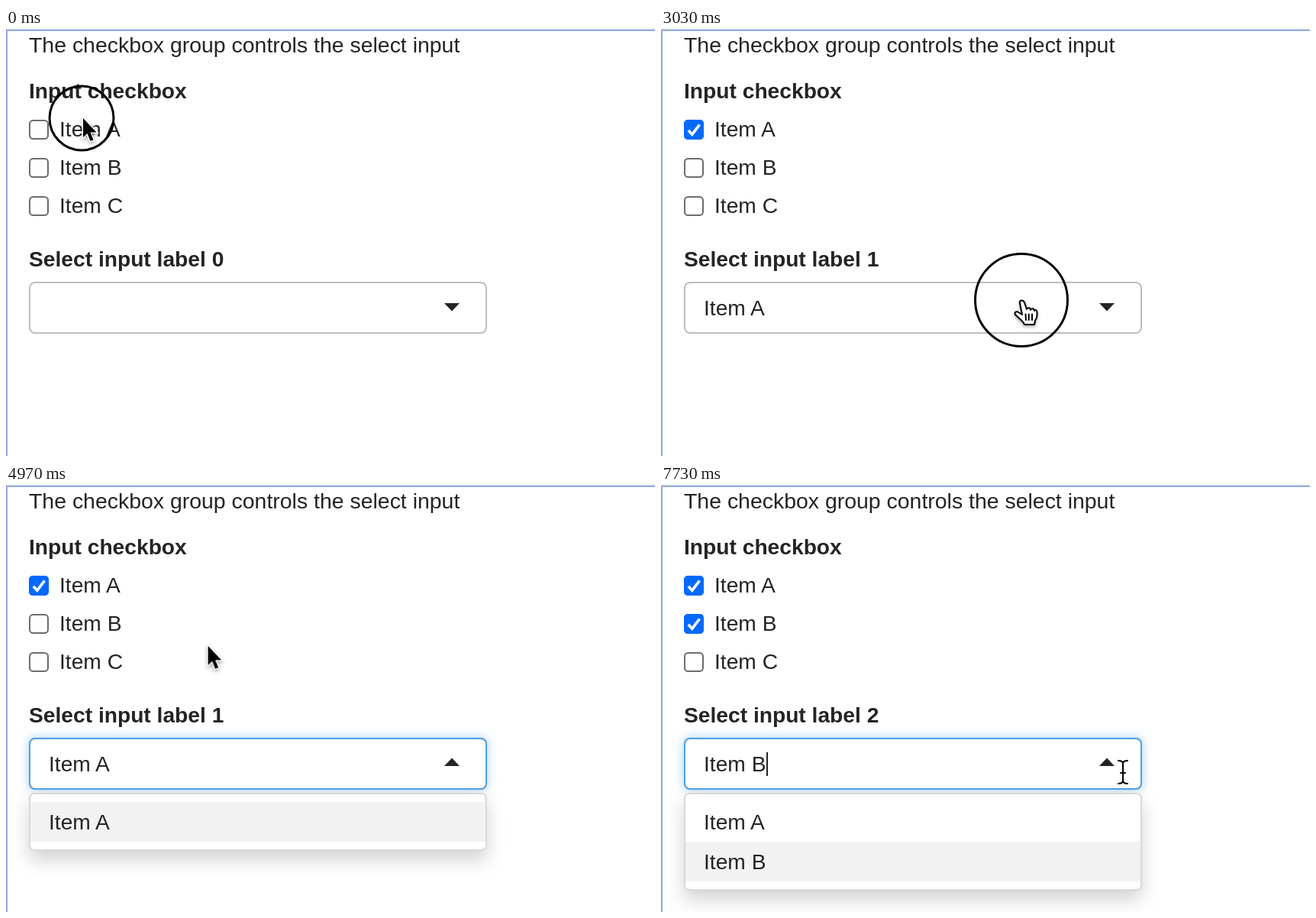
An HTML page for the animation above (8 s loop, 850 px wide and 560 px high).

```html
<!DOCTYPE html>
<html lang="en">
<head>
<meta charset="utf-8">
<title>Checkbox group and select input</title>
<style>
html, body { margin: 0; width: 100%; height: 100%; overflow: hidden; background: #fff; }
svg { display: block; width: 850px; height: 560px; }
text { font: 28.2px "Liberation Sans", Arial, sans-serif; fill: #222426; }
.title { font-size: 28.45px; }
.bold { font-weight: bold; }
.box { fill: #fff; stroke: #6d6d6d; stroke-width: 2; }
.hover { fill: none; stroke: #404040; stroke-width: 2; }
.field { fill: #fff; stroke: #bfbfc1; stroke-width: 2; }
.focus { stroke: #529fe2; filter: drop-shadow(0 0 7px rgba(102,175,233,.6)); }
.menu { fill: #fff; stroke: #d9d9d9; stroke-width: 2; filter: drop-shadow(0 12px 12px rgba(0,0,0,.175)); }
.active { fill: #f2f2f2; }
.dark { fill: #222426; }

/* on/off states */
.step { animation: 8s step-end infinite; }
.hoverA { animation-name: hoverA; }
.hoverB { animation-name: hoverB; }
.checkA { animation-name: checkA; }
.checkB { animation-name: checkB; }
.none { animation-name: none-picked; }
.one { animation-name: one-picked; }
.two { animation-name: two-picked; }
.focused { animation-name: focused; }
.opened { animation-name: opened; }
.closed { animation-name: closed; }
.menu1 { animation-name: menu1; }
.menu2 { animation-name: menu2; }
.caret { animation-name: caret; }
.arrow { animation-name: arrow; }
.hand { animation-name: hand; }
.beam { animation-name: beam; }
@keyframes hoverA { 0%, 24.125% { opacity: 0 } 14.5% { opacity: 1 } }
@keyframes hoverB { 0%, 67.125% { opacity: 0 } 64% { opacity: 1 } }
@keyframes checkA { 0% { opacity: 0 } 24.125% { opacity: 1 } }
@keyframes checkB { 0% { opacity: 0 } 67.125% { opacity: 1 } }
@keyframes none-picked { 0% { opacity: 1 } 25% { opacity: 0 } }
@keyframes one-picked { 0%, 68.125% { opacity: 0 } 25% { opacity: 1 } }
@keyframes two-picked { 0% { opacity: 0 } 68.125% { opacity: 1 } }
@keyframes focused { 0%, 66.625% { opacity: 0 } 38.5%, 83.5% { opacity: 1 } }
@keyframes opened { 0%, 66.625%, 87.5% { opacity: 0 } 38.5%, 83.5%, 95% { opacity: 1 } }
@keyframes closed { 0%, 66.625%, 87.5% { opacity: 1 } 38.5%, 83.5%, 95% { opacity: 0 } }
@keyframes menu1 { 0%, 66.625% { opacity: 0 } 38.5% { opacity: 1 } }
@keyframes menu2 { 0%, 87.5% { opacity: 0 } 83.5%, 95% { opacity: 1 } }
@keyframes caret {
  0%, 44.75%, 57.25%, 66.625%, 87.5% { opacity: 0 }
  38.5%, 51%, 63.5%, 83.5%, 95% { opacity: 1 }
}
@keyframes arrow {
  0%, 30.9%, 58.5%, 71.6% { opacity: 1 }
  14%, 35%, 63.25%, 76.9% { opacity: 0 }
}
@keyframes hand {
  0%, 30.9%, 38.5%, 71.6%, 83.5%, 95% { opacity: 0 }
  14%, 35%, 63.25%, 76.9%, 87.5% { opacity: 1 }
}
@keyframes beam {
  0%, 58.5%, 87.5% { opacity: 0 }
  38.5%, 83.5%, 95% { opacity: 1 }
}

/* pointer path and click rings */
.pointer { animation: move 8s ease-in-out infinite; }
@keyframes move {
  0%, .375% { transform: translate(99px, 118px) }
  6.625%, 10% { transform: translate(506px, 280px) }
  15.875%, 19.125% { transform: translate(64px, 126px) }
  20.375%, 27.5% { transform: translate(54px, 135px) }
  37.25%, 44.625% { transform: translate(472px, 356px) }
  48.75%, 50% { transform: translate(565px, 367px) }
  53.75% { transform: translate(580px, 370px) }
  55% { transform: translate(580px, 370px); animation-timing-function: ease-in }
  62.125% { transform: translate(264px, 212px); animation-timing-function: ease-out }
  65% { transform: translate(72px, 187px) }
  68.5% { transform: translate(72px, 187px); animation-timing-function: ease-in }
  76.25% { transform: translate(545px, 314px); animation-timing-function: ease-out }
  80%, 100% { transform: translate(605px, 377px) }
}
.ring { fill: none; stroke: #000; stroke-width: 3; animation: ring 8s linear infinite; }
@keyframes ring {
  0%, .5% { r: 60.5px; opacity: 1 }
  2.5% { r: 0; opacity: 1 }
  2.51%, 100% { r: 0; opacity: 0 }
}
.shade { filter: drop-shadow(0 2px 2px rgba(0,0,0,.35)); }
.ink { fill: none; stroke: #000; stroke-width: 2; stroke-linecap: round; }
.halo { fill: none; stroke: #fff; stroke-width: 4.5; stroke-linecap: round; }
</style>
</head>
<body>
<svg viewBox="0 0 850 560">
  <defs>
    <g id="tick">
      <rect width="26" height="26" rx="5" fill="#0569ff"/>
      <path d="M5.8 14 10.8 19.2 20.5 6.5" fill="none" stroke="#fff" stroke-width="3.6"/>
    </g>
    <rect id="square" x="1" y="1" width="24" height="24" rx="4.5"/>
    <rect id="frame" x="31" y="333" width="598" height="66" rx="7"/>
    <path id="ibeam" d="M-6-15Q0-15 0-11Q0-15 6-15M-6 15Q0 15 0 11Q0 15 6 15M0-11V11M-3 1H3"/>
  </defs>

  <rect width="850" height="3" fill="#ececf0"/>
  <path d="M0 3H850M1 3V560" fill="none" stroke="#8ea8de" stroke-width="2"/>

  <text class="title" x="30" y="32">The checkbox group controls the select input</text>
  <text class="bold" x="30" y="92">Input checkbox</text>

  <use href="#square" class="box" x="30" y="120"/>
  <use href="#square" class="box" x="30" y="170"/>
  <use href="#square" class="box" x="30" y="220"/>
  <use href="#square" class="hover step hoverA" x="30" y="120"/>
  <use href="#square" class="hover step hoverB" x="30" y="170"/>
  <use href="#tick" class="step checkA" x="30" y="120"/>
  <use href="#tick" class="step checkB" x="30" y="170"/>
  <text x="70" y="142">Item A</text>
  <text x="70" y="192">Item B</text>
  <text x="70" y="242">Item C</text>

  <text class="bold step none" x="30" y="312">Select input label 0</text>
  <text class="bold step one" x="30" y="312">Select input label 1</text>
  <text class="bold step two" x="30" y="312">Select input label 2</text>

  <use href="#frame" class="field"/>
  <g class="step focused"><use href="#frame" class="field focus"/></g>
  <text class="step one" x="56" y="376">Item A</text>
  <text class="step two" x="56" y="376">Item B</text>
  <rect class="dark step caret" x="138" y="351" width="2" height="31"/>
  <path class="dark step closed" d="M574 360H594L584 370.5Z"/>
  <path class="dark step opened" d="M574 369H594L584 358.5Z"/>

  <g class="step menu1">
    <rect class="menu" x="31" y="405" width="598" height="74" rx="6"/>
    <rect class="active" x="32" y="416" width="596" height="52"/>
    <text x="56" y="452">Item A</text>
  </g>
  <g class="step menu2">
    <rect class="menu" x="31" y="405" width="598" height="126" rx="6"/>
    <rect class="active" x="32" y="468" width="596" height="52"/>
    <text x="56" y="452">Item A</text>
    <text x="56" y="504">Item B</text>
  </g>

  <g class="pointer">
    <g class="step arrow">
      <path class="shade" d="M2 0V25L7.5 20 11.5 30 15.5 28.3 11.5 18.5H19.5Z" stroke="#fff" stroke-width="3" paint-order="stroke"/>
    </g>
    <g class="step hand">
      <path class="shade" d="M-2 4C-3 0 2-1 4 3L7 12C8 9 12 10 12 13C13 10 17 11 17 14C18 12 21 13 20.5 17C21 22 20 24 18 27L17 32H4C3 28-3 24-8 19C-10 16-6 14-4 16L1 19Z" fill="#fff" stroke="#000" stroke-width="2" stroke-linejoin="round"/>
      <path class="ink" d="M5.5 18.5 6 26M9.7 18.5V26M14 18.5V26" stroke-width="1.6"/>
    </g>
    <g class="step beam">
      <use href="#ibeam" class="halo"/>
      <use href="#ibeam" class="ink"/>
    </g>
    <circle class="ring" style="animation-delay: -88ms"/>
    <circle class="ring" style="animation-delay: -6170ms"/>
    <circle class="ring" style="animation-delay: -5005ms"/>
    <circle class="ring" style="animation-delay: -2700ms"/>
    <circle class="ring" style="animation-delay: -1405ms"/>
    <circle class="ring" style="animation-delay: -475ms"/>
  </g>
</svg>
</body>
</html>
```
